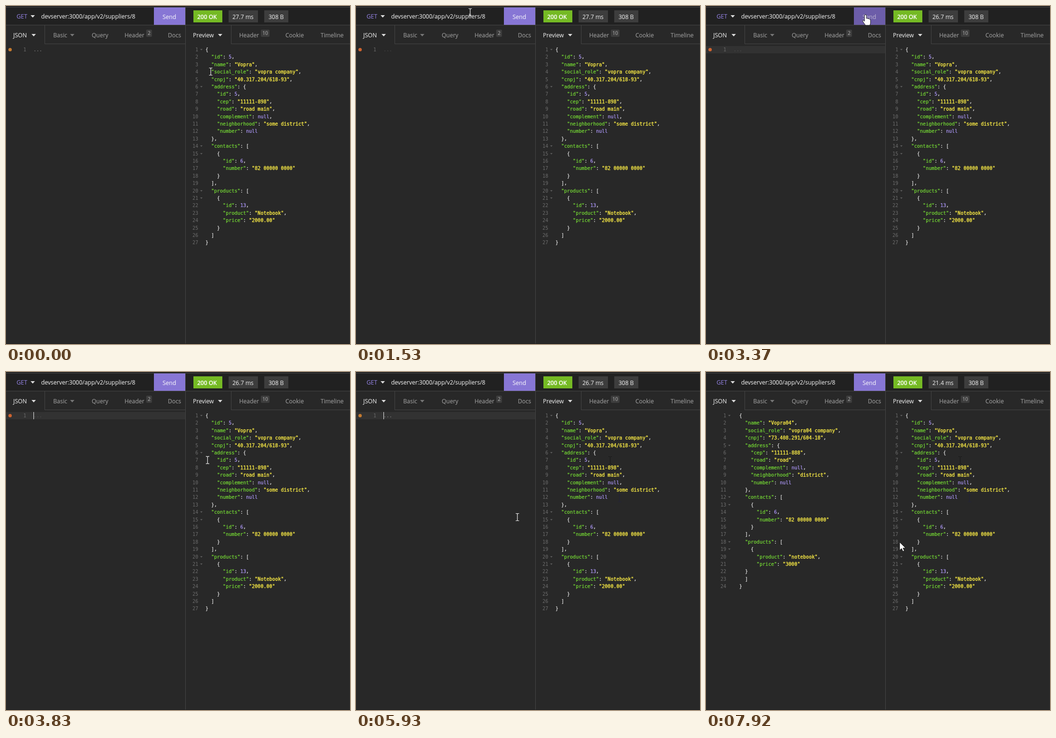
Write an HTML page that moves like this. It is 714 px wide and 701 px high and loops after 7.99 s.

```html
<!DOCTYPE html>
<html lang="en">
<head>
<meta charset="utf-8">
<title>API client</title>
<style>
  html, body { margin: 0; width: 100%; height: 100%; overflow: hidden; background: #282828; }
  svg { display: block; width: 714px; height: 701px; }
  text, tspan { fill: currentColor; stroke: currentColor; }
  text { font: 12px "Open Sans", "Noto Sans", sans-serif; color: #e4e4e4; stroke-width: .12px; white-space: pre; }
  .code text { font: 10px "DejaVu Sans Mono", "Liberation Mono", monospace; stroke-width: .22px; }
  .code .num { color: #6c6c6c; stroke: none; text-anchor: end; }
  .key { color: #76dc35; }
  .str { color: #f8e945; stroke-width: .4px; }
  .val { color: #ae98fa; }
  .fold { fill: #5c5c5c; }
  .dim { color: #9c9c9c; }
  .badge { font-size: 10px; color: #aaa; text-anchor: middle; }
  .line { fill: #454545; }
  .pill { fill: #3d3d3d; }
</style>
</head>
<body>
<svg viewBox="0 0 714 701">
  <defs>
    <path id="drop" d="M0 0h9l-4.500 5z"/>
    <path id="beam" d="M-3.500-7.500H-1L0-6.500 1-7.500H3.500M0-6.500V6.500M-3.500 7.500H-1L0 6.500 1 7.500H3.500" fill="none"/>
  </defs>

  <rect width="714" height="701" fill="#282828"/>
  <rect width="714" height="39" fill="#212121"/>
  <rect y="700" width="714" height="1" fill="#1d1d1d"/>
  <g class="line">
    <rect y="2" width="714" height="1"/>
    <rect y="39" width="714" height="1"/>
    <rect x="80" y="40" width="1" height="38"/>
    <rect x="80" y="78" width="292" height="1"/>
    <rect x="467" y="40" width="1" height="38"/>
    <rect x="467" y="78" width="247" height="1"/>
    <rect x="372" y="3" width="1" height="697"/>
  </g>

  <text x="22" y="26" style="color:#8f7fdc">GET</text>
  <use href="#drop" x="51" y="19" fill="#ddd"/>
  <text x="73" y="26">devserver:3000/app/v2/suppliers/8</text>
  <rect id="send" x="307" y="3" width="65" height="36"/>
  <text id="sendLabel" x="325" y="27">Send</text>

  <text x="15" y="65">JSON</text>
  <use href="#drop" x="53" y="58" fill="#ddd"/>
  <use href="#drop" x="133" y="58" fill="#777"/>
  <g id="tabs"></g>
  <rect class="pill" x="291" y="49" width="12" height="15" rx="2"/>
  <text class="badge" x="297" y="60">2</text>
  <text x="388" y="65">Preview</text>
  <use href="#drop" x="440" y="58" fill="#ddd"/>
  <rect class="pill" x="529" y="49" width="18" height="15" rx="2"/>
  <text class="badge" x="538" y="60">10</text>

  <rect x="389" y="9" width="60" height="25" fill="#75ba24"/>
  <text x="397" y="27" style="color:#fff;font-weight:600">200 OK</text>
  <rect class="pill" x="462" y="9" width="61" height="25"/>
  <text id="elapsed" x="470" y="27"></text>
  <rect class="pill" x="536" y="9" width="50" height="25"/>
  <text x="545" y="27">308 B</text>

  <g id="empty" class="code">
    <rect id="active" y="83" width="372" height="15" fill="#323232"/>
    <circle id="dot" cx="8.500" cy="90.500" r="3.500"/>
    <text class="num" x="42" y="94">1</text>
    <text id="ellipsis" x="57" y="94" style="color:#777">...</text>
    <rect id="caret" x="57" y="83" width="1" height="15" fill="#eee"/>
  </g>
  <g id="request" class="code"></g>
  <g id="response" class="code"></g>
  <rect id="loading" x="373" y="3" width="341" height="697" fill="#282828" opacity=".55"/>

  <g id="trail">
    <use href="#beam" x="527.5" y="183" stroke="#171717"/>
    <use href="#beam" x="547" y="262" stroke="#23233a"/>
  </g>
  <circle id="click" cx="329" cy="18" r="12" fill="#c8b345"/>
  <g id="pointer">
    <use id="beamCursor" href="#beam" stroke="#eee" stroke-width="1.200"/>
    <path id="arrowCursor" d="M0 0V16.500L4 13 6.700 19 9.500 17.800 6.800 12H12Z" fill="#fff" stroke="#111" stroke-width=".8"/>
    <path id="handCursor" d="M0 2Q0 0 2 0T4 2V8Q6 6.500 7.500 8.500 9.500 7.500 10.500 9.500 12.500 9 12.500 12V16Q12.500 19 11 22H2L-3.500 14Q-4.500 11.500-2.500 11.500L0 13.500Z" fill="#fff" stroke="#111" stroke-width=".9"/>
  </g>
</svg>
<script>
const $ = id => document.getElementById(id);
const LOOP = 7990;
const ROW = 15.4;
const CHAR = 6.02;

const responseBody = `{
  "id": 5,
  "name": "Vopra",
  "social_role": "vopra company",
  "cnpj": "40.317.204/618-93",
  "address": {
    "id": 5,
    "cep": "11111-898",
    "road": "road main",
    "complement": null,
    "neighborhood": "some district",
    "number": null
  },
  "contacts": [
    {
      "id": 6,
      "number": "82 00000 0000"
    }
  ],
  "products": [
    {
      "id": 13,
      "product": "Notebook",
      "price": "2000.00"
    }
  ]
}`;

const requestBody = `{
  "name": "Vopra04",
  "social_role": "vopra04 company",
  "cnpj": "73.408.291/604-18",
  "address": {
    "cep": "11111-888",
    "road": "road",
    "complement": null,
    "neighborhood": "district",
    "number": null
  },
  "contacts": [
    {
      "id": 6,
      "number": "82 00000 0000"
    }
  ],
  "products": [
    {
      "product": "notebook",
      "price": "3000"
  }
  ]
}`;

function highlight(line) {
  const span = (cls, s) => `<tspan class="${cls}">${s}</tspan>`;
  return line.replace(/("[^"]*")(?=:)|("[^"]*")|\b(\d+|null)\b/g, (all, key, str) =>
    span(key ? 'key' : str ? 'str' : 'val', all));
}

function renderCode(id, body, numX, codeX) {
  $(id).innerHTML = body.split('\n').map((line, i) => {
    const y = 94 + Math.round(i * ROW);
    const code = line.trimStart();
    const x = codeX + (line.length - code.length) * CHAR;
    const fold = /[{[]$/.test(code)
      ? `<path class="fold" d="M${numX + 4} ${y - 5}h5l-2.500 3z"/>` : '';
    return `<text class="num" x="${numX}" y="${y}">${i + 1}</text>${fold}` +
      `<text x="${x}" y="${y}">${highlight(code)}</text>`;
  }).join('');
}

function renderTabs() {
  const left = { Basic: 98, Query: 178, Header: 246, Docs: 336 };
  const right = { Header: 484, Cookie: 580, Timeline: 653 };
  $('tabs').innerHTML = [left, right].flatMap(Object.entries)
    .map(([name, x]) => `<text class="dim" x="${x}" y="65">${name}</text>`).join('');
}

// Pointer stops: arrival time, x, y and an optional rest before moving on
const stops = [
  [0, 425, 136, 70],
  [350, 476, 300],
  [840, 222, 24],
  [1180, 355, 22],
  [1530, 237, 13],
  [1880, 285, 23, 200],
  [2400, 329, 18, 1230],
  [4050, 520, 370],
  [4460, 634, 238],
  [4830, 500, 450],
  [5250, 580, 58],
  [5620, 450, 575],
  [5930, 335, 301, 140],
  [6910, 604, 692, 740],
  [7920, 402, 353]
];

function pointerAt(t) {
  const next = stops.findIndex(s => s[0] > t);
  if (next < 0) return stops.at(-1).slice(1);
  const [arrived, x0, y0, rest = 0] = stops[next - 1];
  const [arrival, x1, y1] = stops[next];
  const depart = arrived + rest;
  const k = Math.max(0, (t - depart) / (arrival - depart));
  const ease = k * k * (3 - 2 * k);
  return [x0 + (x1 - x0) * ease, y0 + (y1 - y0) * ease];
}

function show(id, on) {
  $(id).style.display = on ? '' : 'none';
}

const CLICK = 2600, LOADING = 2700, LOADED = 3300, PASTE = 7250, BLINK = 530;

function draw(t) {
  const between = (a, b) => t >= a && t < b;
  const [x, y] = pointerAt(t);
  const overSend = x >= 307 && x < 372 && y >= 3 && y < 39;
  const overText = y < 39 ? x > 66 && x < 307 : y > 79 && (x < 372 || x > 411);
  $('pointer').setAttribute('transform', `translate(${x} ${y})`);
  show('handCursor', overSend);
  show('beamCursor', !overSend && overText);
  show('arrowCursor', !overSend && !overText);

  $('send').setAttribute('fill', overSend ? '#6c5da9' : '#8776d5');
  $('sendLabel').style.color = overSend ? '#b9b0cf' : '#f2f0fa';
  $('elapsed').textContent = (t < LOADED ? '27.7' : t < PASTE ? '26.7' : '21.4') + ' ms';

  const pasted = t >= PASTE;
  const faded = between(1000, 4100);
  show('empty', !pasted);
  show('request', pasted);
  show('active', t >= CLICK);
  show('caret', between(CLICK, LOADED) || (t >= LOADED && (t - CLICK) % (2 * BLINK) < BLINK));
  $('dot').setAttribute('fill', faded ? '#cf632f' : '#c57a2f');
  $('ellipsis').style.opacity = faded ? 0.35 : 1;

  show('loading', between(LOADING, LOADED));
  show('click', between(CLICK, LOADED));
  show('trail', t >= 4250);
}

renderTabs();
renderCode('response', responseBody, 399, 414);
renderCode('request', requestBody, 42, 69);

const start = performance.now();
function tick() {
  draw((performance.now() - start) % LOOP);
  requestAnimationFrame(tick);
}
tick();
</script>
</body>
</html>
```
